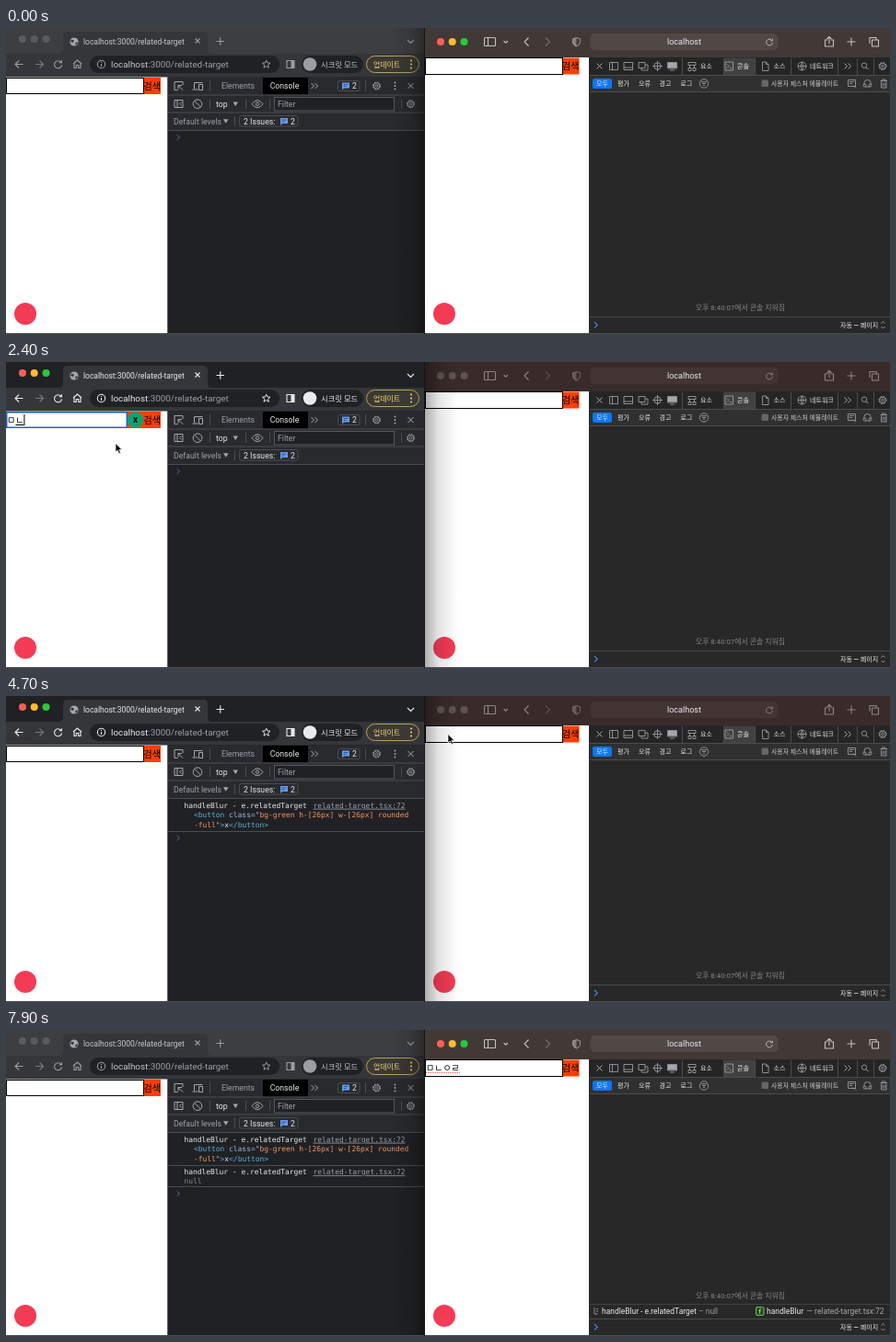
Write an HTML page that moves like this. It is 960x333 px and loops after 8.43 s.

```html
<!DOCTYPE html>
<html lang="ko">
<head>
<meta charset="utf-8">
<title>related-target</title>
<style>
html, body { margin: 0; width: 100%; height: 100%; overflow: hidden; background: #111; }
svg { display: block; width: 960px; height: 333px; }
text { font: 8.7px Roboto, "Noto Sans CJK KR", "Noto Sans CJK", sans-serif; fill: #e8eaed; white-space: pre; }
.mono { font: 7.92px "DejaVu Sans Mono", monospace; }
.log { font-size: 8.45px; }
.ko { font-size: 7px; font-weight: 500; }
.page text, .cross { font-size: 10px; font-weight: 500; fill: #000; }
.mid { text-anchor: middle; }
.dim, .mono .dim { fill: #9aa0a6; }
.i { fill: none; stroke: #a4a8ad; }
.thin { stroke-width: .8; }
.line { fill: none; stroke: #4a4c50; }
.blue { fill: none; stroke: #4b83dd; stroke-width: 1.2; }
.solid { fill: #a4a8ad; }
.red { fill: #fb3f04; }

#chrome { --strip: #3c3e41; --ink: #9a9da1; --word: #c4c6c9; --r: #595b5e; --y: #595b5e; --g: #595b5e; }
#safari { --strip: #392b2a; --pill: #423432; --ink: #8e8482; --r: #5f5352; --y: #5f5352; --g: #5f5352; }
#chrome.on { --strip: #202124; --ink: #e8eaed; --word: #e8eaed; }
#safari.on { --strip: #403936; --pill: #4f4845; --ink: #c5c0be; }
#chrome.on, #safari.on { --r: #ff5f57; --y: #febc2e; --g: #28c840; }
.ink { fill: none; stroke: var(--ink); stroke-width: 1.1; }
.word { fill: var(--word); }
</style>
</head>
<body>
<svg viewBox="0 0 960 333">
<defs>
  <linearGradient id="fade">
    <stop offset="0" stop-opacity=".32"/><stop offset=".4" stop-opacity=".11"/><stop offset="1" stop-opacity="0"/>
  </linearGradient>
  <g id="lights">
    <circle r="4" fill="var(--r)"/><circle cx="12.7" r="4" fill="var(--y)"/><circle cx="25.5" r="4" fill="var(--g)"/>
  </g>
  <g id="gear"><circle class="i" r="4" stroke-dasharray="1.7 1.44"/><circle class="i thin" r="3.3"/><circle class="i thin" r="1.3"/></g>
  <path id="x" class="i" d="M-3-3 3 3M3-3-3 3"/>
  <path id="more" class="i" d="M-4-3-1 0-4 3M0-3 3 0 0 3"/>
  <g id="msg"><path d="M-4-3.5h8v6h-6l-2 2z" fill="#669df6"/><path d="M-2.5-1.5h5M-2.5.5h3" stroke="#23406e" stroke-width=".8"/></g>
  <path id="reload" d="M3.2-2.2A4 4 0 1 0 4 .8M3.9-4.3v2.6H1.3"/>
  <g id="clear"><circle r="8.8" fill="#12a071"/><text y="3.3" class="cross mid">x</text></g>
</defs>

<g id="chrome" class="on">
  <rect width="454" height="333" fill="var(--strip)"/>
  <use href="#lights" x="18" y="12"/>
  <path d="M57 28q5 0 5-5v-14q0-5 5-5h147q5 0 5 5v14q0 5 5 5z" fill="#35363a"/>
  <rect y="28" width="454" height="25.5" fill="#35363a"/>
  <circle cx="74" cy="15" r="4.6" class="solid"/>
  <path d="M71 12.5l3 1-1 2.5-3-1M75 17l2-2 1 1-2 3" fill="#35363a"/>
  <text x="84" y="17.6" class="word" style="font-size:8.48px">localhost:3000/related-target</text>
  <path class="ink" d="M205.5 11.5l5 5m0-5l-5 5M228.5 14.5h8.5M232.75 10.25v8.5M436 13l3.5 3.5 3.5-3.5"/>
  <path class="ink" d="M18.5 39.5H10M14 35.5l-4 4 4 4"/>
  <path d="M32 39.5h8.5M36.5 35.5l4 4-4 4" fill="none" stroke="#77797c" stroke-width="1.1"/>
  <use href="#reload" x="56.5" y="39.5" class="ink"/>
  <path class="ink" d="M73 39l4.5-4 4.5 4M74 38.5v5h2.3v-3h2.4v3H81v-5"/>
  <rect x="91" y="30" width="206" height="19" rx="9.5" fill="#202124"/>
  <circle cx="103.5" cy="39.5" r="4.2" class="ink"/>
  <path class="ink" d="M103.5 37v1M103.5 39v3"/>
  <text x="114" y="43" class="dim" style="font-size:9.87px"><tspan class="word">localhost</tspan>:3000/related-target</text>
  <path class="ink" transform="translate(282.7 39.5) scale(.87)" d="M0-5l1.4 3.2 3.5.3-2.7 2.3.9 3.5L0 2.400l-3.100 1.900.9-3.500-2.700-2.300 3.500-.3z"/>
  <path class="ink" d="M305 35.5h8v8h-8z"/><path d="M309.5 35.5h3.5v8h-3.5z" fill="var(--ink)"/>
  <rect x="321" y="30" width="67" height="19" rx="9.5" fill="#202124"/>
  <circle cx="330" cy="39.5" r="7.3" fill="var(--ink)"/>
  <text x="342" y="42.5" class="word" style="font-size:8.3px">시크릿 모드</text>
  <rect x="391.5" y="30.5" width="57" height="18" rx="9" fill="#3b3933" stroke="#b6a061"/>
  <text x="399" y="42.5" style="font-size:7.9px;fill:#f2d77c">업데이트</text>
  <path d="M440 35.5h.01M440 39.5h.01M440 43.5h.01" stroke="#f2d77c" stroke-width="2" stroke-linecap="round"/>

  <g class="page">
    <rect y="53.5" width="175.5" height="279" fill="#fff"/>
    <rect x="130" y="54" width="38" height="18" class="red"/>
    <text x="149.5" y="66.5">검색</text>
    <g id="box1"></g>
    <circle cx="21" cy="311" r="12" fill="#f33b55"/>
  </g>

  <rect x="175.5" y="53.5" width="278.5" height="279" fill="#202124"/>
  <rect x="176" y="53.5" width="278" height="57.5" fill="#292a2d"/>
  <rect x="279" y="54" width="49" height="18.5" fill="#000"/>
  <path class="line" d="M176 73h278M176 92h278M176 111.5h278M221.5 57v12M390.5 57v12M221.5 77v11M260.5 77v11M286.5 77v11M429.5 77v11M248.5 96v11"/>
  <path class="i" d="M192 62v-3.5h-9v9h3.5M187 62.5l5 5m-5-5v4m0-4h4M204.5 66v-6.5h9M202.5 67h6M209.5 61.5h4v6h-4z"/>
  <text x="234" y="66.3" class="dim">Elements</text>
  <text x="286.7" y="66.3">Console</text>
  <use href="#more" x="335.5" y="63"/>
  <rect x="360.5" y="57.5" width="23.5" height="11" rx="2" class="line"/>
  <use href="#msg" x="369" y="63"/><text x="376" y="66.3">2</text>
  <use href="#gear" x="402.5" y="63"/>
  <path d="M422.5 59.5h.01M422.5 63h.01M422.5 66.5h.01" stroke="#a4a8ad" stroke-width="1.9" stroke-linecap="round"/>
  <use href="#x" x="439.5" y="63"/>
  <path class="i" d="M183 78.5h9v8h-9zM186 78.5v8M190.5 80.5l-2 2 2 2"/>
  <rect id="hover" x="198" y="73.5" width="21" height="18.5" fill="#45474b"/>
  <circle cx="208" cy="82.7" r="4.8" class="i"/><path class="i" d="M204.7 79.3l6.7 6.7"/>
  <text x="228" y="86">top</text><path class="solid" d="M246.5 80.5h5.5l-2.75 4.5z"/>
  <path class="i" d="M267 82.7q6-8 12 0q-6 8-12 0"/><circle cx="273" cy="82.7" r="1.7" class="i"/>
  <rect x="291.5" y="75.5" width="130" height="14.5" fill="#202124" stroke="#55585c"/>
  <text x="295" y="86" class="dim">Filter</text>
  <use href="#gear" x="439.5" y="82.7"/>
  <text x="182" y="104.5" class="dim">Default levels</text><path class="solid" d="M236 99.3h5.5l-2.75 4.5z"/>
  <rect x="253.5" y="95.5" width="63.5" height="11.5" rx="2" class="line"/>
  <text x="258" y="104.5">2 Issues:</text><use href="#msg" x="302" y="101.5"/><text x="309" y="104.5">2</text>

  <g id="log1" class="mono">
    <text x="193.5" y="121.7" class="mono">handleBlur - e.relatedTarget</text>
    <text x="333.5" y="121.7" class="mono dim" text-decoration="underline">related-target.tsx:72</text>
    <text x="204" y="132.3" class="mono" style="fill:#f29766"><tspan fill="#5db0d7">&lt;button</tspan><tspan fill="#9bbbdc"> class="</tspan>bg-green h-[26px] w-[26px] rounded</text>
    <text x="204" y="143.2" class="mono" style="fill:#f29766">-full<tspan fill="#9bbbdc">"</tspan><tspan fill="#5db0d7">&gt;</tspan><tspan fill="#e8eaed">x</tspan><tspan fill="#5db0d7">&lt;/button&gt;</tspan></text>
    <path class="line" d="M176 147.5h278"/>
  </g>
  <g id="log2">
    <text x="193.5" y="157.3" class="mono">handleBlur - e.relatedTarget</text>
    <text x="333.5" y="157.3" class="mono dim" text-decoration="underline">related-target.tsx:72</text>
    <text x="193.5" y="167" class="mono" style="fill:#7f868d">null</text>
    <path class="line" d="M176 170.5h278"/>
  </g>
  <path id="prompt" fill="none" stroke="#56659c" d="M185.5-2.7l3 2.7-3 2.7"/>
</g>

<g id="safari">
  <path d="M455 0h505v333h-505z" fill="var(--strip)"/>
  <use href="#lights" x="472" y="15"/>
  <path class="ink" d="M520.5 10.5h10q1 0 1 1v7q0 1-1 1h-10q-1 0-1-1v-7q0-1 1-1M523.5 10.5v9M540.5 14l2.2 2.2 2.2-2.2M567.5 10.5l-4.5 4.5 4.5 4.5"/>
  <path class="ink" d="M586 10.5l4.5 4.5-4.5 4.5" opacity=".4"/>
  <path class="ink" d="M619.5 10.5l4 1.5v3q0 3-4 5q-4-2-4-5v-3z" opacity=".6"/>
  <path d="M619.5 10.5v9.5q-4-2-4-5v-3z" fill="var(--ink)" opacity=".5"/>
  <rect x="634.5" y="6" width="204" height="18" rx="5" fill="var(--pill)"/>
  <text x="736.5" y="18.3" class="mid" style="font-size:9.05px">localhost</text>
  <use href="#reload" transform="translate(829 15.3) scale(.85)" class="ink"/>
  <path class="ink" d="M892 13h-2.5v7h9v-7H896M894 17V9.5M891.5 12l2.5-2.5 2.5 2.5M913.5 15h9M918 10.5v9M940.5 13h7v7h-7zM938 17v-6.5h7v2.5"/>

  <g class="page">
    <rect x="455" y="32" width="178" height="300.5" fill="#fff"/>
    <rect x="585" y="32.5" width="37.5" height="18" class="red"/>
    <text x="604" y="44.8">검색</text>
    <g id="box2"></g>
    <circle cx="476" cy="311" r="12" fill="#f33b55"/>
  </g>

  <rect x="633" y="32" width="327" height="300.5" fill="#282828"/>
  <rect x="634" y="32.5" width="326" height="18.5" fill="#252525"/>
  <rect x="634" y="51" width="326" height="18" fill="#303030"/>
  <rect x="780" y="32.5" width="33" height="18.5" fill="#414141"/>
  <path class="line" d="M634 51.5h326M634 69.5h326M634 314.5h326M734.5 33v18M779.5 33v18M813.5 33v18M852.5 33v18M903.5 33v18M924.5 33v18M942.5 33v18"/>
  <use href="#x" x="644.5" y="41.5"/>
  <path class="i thin" d="M655.5 37.5h9v8h-9zM658.5 37.5v8M671 37.5h9.5v8H671zM671 43h9.5M687 37.5h7v6h-7zM690 43.5v2.5h7v-6h-3M707.5 36v11M702 41.5h11M718.5 37.5h10v6.5h-10zM721 46h5"/>
  <circle cx="707.5" cy="41.5" r="3.7" class="i thin"/><rect x="719" y="38" width="9" height="5.5" class="solid"/>
  <path class="i thin" d="M741 37.5h8v3h-8zM741 43.5h3v3h-3zM746 43.5h3v3h-3zM742.5 40.5v3M747.5 40.5v3M781 37h8.5v9H781zM783 39.5l2 2-2 2M786 43.5h2M821.5 37h4l2.5 2.5v7h-6.5zM825.5 37v2.5h2.5M860 41.5h9M864.5 37q-3 4.5 0 9q3-4.5 0-9"/>
  <circle cx="864.5" cy="41.5" r="4.5" class="i thin"/>
  <text x="754" y="44.2" class="ko">요소</text><text x="794" y="44.2" class="ko">콘솔</text>
  <text x="833.5" y="44.2" class="ko">소스</text><text x="873" y="44.2" class="ko">네트워크</text>
  <use href="#more" x="914.5" y="41.5"/>
  <circle cx="932" cy="40.7" r="2.7" class="i thin"/><path class="i" d="M934 42.7l2.5 2.5"/>
  <use href="#gear" x="952" y="41.5"/>
  <rect x="637" y="55" width="21" height="11" rx="2.5" fill="#0a78f5"/>
  <text x="641" y="63" class="ko">모두</text><text x="664" y="63" class="ko">평가</text><text x="687" y="63" class="ko">오류</text>
  <text x="709.5" y="63" class="ko">경고</text><text x="732.5" y="63" class="ko">로그</text>
  <circle cx="758" cy="60.5" r="4.7" class="i thin"/><path class="i thin" d="M755 58.7h6M756 60.5h4M757 62.3h2"/>
  <rect x="820.5" y="56.5" width="7.5" height="7.5" rx="1.5" fill="#666"/>
  <text x="831" y="63" class="ko" style="font-size:6.9px;fill:#c9c9c9">사용자 제스처 에뮬레이트</text>
  <path class="i thin" d="M914.5 56.5h8v7h-8zM916 58.5h5M916 60.5h3M920 62.5l3 3M932 62v-2.5q0-3 3.5-3q3.5 0 3.5 3V62M933 64h5M949.5 57.5h7.5M951.5 57.5v-1.5h3.5v1.5M950.5 58.5v6.5h5.5v-6.5M952.3 59.5v4M954.3 59.5v4"/>
  <circle cx="932.5" cy="62.5" r="1.5" class="i thin"/><circle cx="938.5" cy="62.5" r="1.5" class="i thin"/>
  <text id="cleared" x="797.5" class="mid" style="font-size:7.9px;fill:#858585">오후 8:40:07에서 콘솔 지워짐</text>
  <g id="log3">
    <path class="line" d="M634 298.5h326" opacity=".7"/>
    <path class="i thin" d="M639 302v7h3.5M641 303.5h2M641 306h2"/>
    <text x="647" y="309" class="log">handleBlur - e.relatedTarget <tspan fill="#999">– null</tspan></text>
    <rect x="814.5" y="301.5" width="8.5" height="9" rx="1.5" fill="#214c1d" stroke="#7cbd62"/>
    <text x="818.8" y="309" class="mid" font-style="italic" style="font-size:7.5px">f</text>
    <text x="826" y="309" class="log">handleBlur</text>
    <text x="953.5" y="309" class="log" text-anchor="end" style="fill:#aaa">— related-target.tsx:72</text>
  </g>
  <path class="blue" d="M639 320l3.2 3.2-3.2 3.2"/>
  <text x="906" y="325.7" class="ko">자동 — 페이지</text>
  <path class="i thin" d="M950.5 321.5l2-2 2 2M950.5 325l2 2 2-2"/>
</g>
<!-- the front window casts a shadow on its neighbour -->
<rect id="shadeRight" x="455" width="36" height="333" fill="url(#fade)"/>
<rect id="shadeLeft" width="36" height="333" fill="url(#fade)" transform="translate(454) scale(-1 1)"/>
<path d="M454.5 0v333" stroke="#151515"/>
<path d="M0 332.5h454M455 332.5h505" stroke="#4b4b4b"/>
<g id="cursor">
  <path id="arrow" d="M0 0v9.5l2.2-2 1.6 3.7 1.7-.8-1.6-3.5h3z" fill="#000" stroke="#fff" stroke-width=".7"/>
  <path id="hand" d="M1 1q1-1 2 0v4l4.5 1v4l-1 3h-4L-1 8.5q0-1.5 2-.5z" fill="#fff" stroke="#000" stroke-width=".9"/>
</g>
</svg>
<script>
const LOOP = 8430, STEP = 100;
const $ = id => document.getElementById(id);
const show = (id, on) => $(id).style.display = on ? '' : 'none';
const within = (t, from, to) => t >= from && t < to;
const clamp = (v, lo, hi) => Math.max(lo, Math.min(hi, v));

// time, x, y of the pointer tip
const path = [
  [100, 912, 312], [900, 214, 84], [1000, 208, 82], [1300, 68, 62], [2000, 68, 62],
  [2300, 119, 88.5], [2700, 119, 88.5], [3100, 140, 64], [3900, 140, 64], [4700, 480, 41.5],
  [5000, 480, 41.5], [5200, 569, 63], [6100, 569, 63], [6500, 594, 40], [7000, 594, 40], [7300, 940, -14]
];

function pointer(t) {
  const n = clamp(path.findIndex(p => p[0] > t), 1, path.length - 1);
  const [t0, x0, y0] = path[n - 1], [t1, x1, y1] = path[n];
  const k = clamp((t - t0) / (t1 - t0), 0, 1), e = k * k * (3 - 2 * k);
  return [x0 + (x1 - x0) * e, y0 + (y1 - y0) * e];
}

function field(id, x, y, h, { count, focus, button, ring, compose, spell }) {
  const w = button ? 132 : 150, pen = focus ? 1.5 : 1, end = x + 1 + count * 9.2;
  const line = (x1, x2, yy, style) => `<path d="M${x1} ${yy}H${x2}" ${style}/>`;
  $(id).innerHTML =
    `<rect x="${x + pen / 2}" y="${y + pen / 2}" width="${w - pen}" height="${h - pen}" fill="#fff" stroke="${focus ? ring : '#000'}" stroke-width="${pen}"/>` +
    `<text x="${x + 1}" y="${y + 12.5}">${'ㅁㄴㅇㄹ'.slice(0, count)}</text>` +
    (compose && count ? line(end - 9, end, y + 14.5, 'stroke="#000"') : '') +
    (spell ? line(x + 1, end, y + 14.5, 'stroke="#f0443a" stroke-dasharray="1 1"') : '') +
    (focus && count ? `<path d="M${end + .5} ${y + 3}v12" stroke="#000"/>` : '') +
    (button ? `<use href="#clear" x="${x + 140.5}" y="${y + h / 2}"/>` : '');
}

function draw(t) {
  const left = within(t, 1400, 4900), right = t < 1000 || t >= 5000;
  $('chrome').classList.toggle('on', left);
  $('safari').classList.toggle('on', right);
  show('shadeRight', left);
  show('shadeLeft', right);
  show('hover', within(t, 1000, 1400));

  field('box1', 0, 54, 18, {
    count: t < 3600 ? clamp(Math.floor((t - 2200) / 100), 0, 4) : 0,
    focus: within(t, 1500, 3200), button: within(t, 1500, 3600),
    ring: '#1767cf', compose: within(t, 2300, 3200)
  });
  field('box2', 455, 32, 19, {
    count: clamp(Math.floor((t - 5600) / 75), 0, 4),
    focus: within(t, 5000, 6900), button: within(t, 5000, 6900),
    ring: '#4978d0', spell: t >= 6900
  });

  const first = t >= 3300, second = t >= 4900, third = t >= 6900;
  show('log1', first);
  show('log2', second);
  show('log3', third);
  $('prompt').setAttribute('transform', `translate(0 ${second ? 178 : first ? 154.5 : 119})`);
  $('cleared').setAttribute('y', third ? 292 : 306.5);

  const [x, y] = pointer(t), hand = within(t, 3100, 4000) || within(t, 6500, 7100);
  show('cursor', within(t, 100, 7300));
  show('arrow', !hand);
  show('hand', hand);
  $('cursor').setAttribute('transform', `translate(${x} ${y})`);
}

function tick() {
  draw(Math.floor(performance.now() % LOOP / STEP) * STEP);
  requestAnimationFrame(tick);
}
tick();
</script>
</body>
</html>
```
